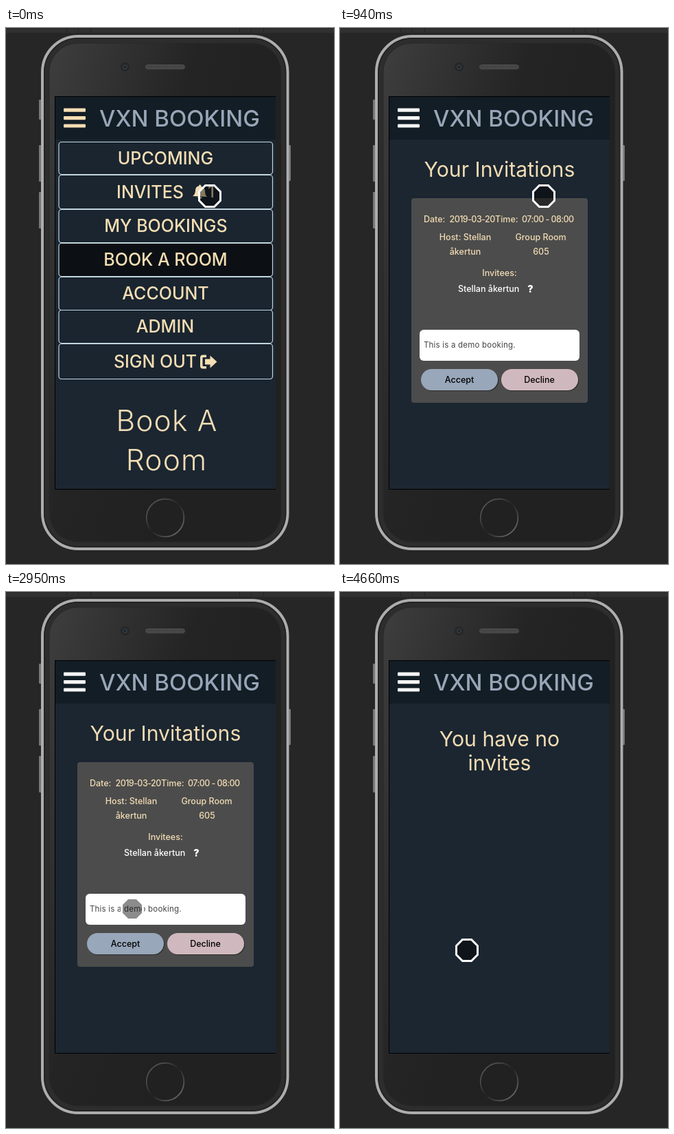
An HTML page that plays this animation: 478x778 px, repeating every 4.89 s.

```html
<!DOCTYPE html>
<html lang="en">
<head>
<meta charset="utf-8">
<title>Room booking demo</title>
<style>
  html, body { margin: 0; width: 100%; height: 100%; overflow: hidden; background: #262626; }
  svg { display: block; width: 478px; height: 778px; font-family: Inter, "Open Sans", sans-serif; }
  text { fill: #f2dcb3; white-space: pre; }
  .mid { text-anchor: middle; }
  .title { font-size: 33px; font-weight: 500; fill: #98a6b8; }
  .item text { font-size: 25px; font-weight: 500; fill: #f5deb3; }
  .heading { font-size: 30.2px; }
  .large { font-size: 42.5px; font-weight: 350; letter-spacing: 1.2px; }
  .card text { font-size: 12.5px; font-weight: 450; }
  .card .digits { letter-spacing: -.55px; }
  .card .white { fill: #fff; }
  .card .button { fill: #000; }
  .card .note { font-size: 11.5px; font-weight: 400; fill: #444; letter-spacing: .2px; }
</style>
</head>
<body>
<svg viewBox="0 0 478 778">
  <defs>
    <linearGradient id="gloss" x1="0" y1="0" x2=".75" y2=".5">
      <stop offset="0" stop-color="#3e3e3e"/>
      <stop offset=".3" stop-color="#313131"/>
      <stop offset=".6" stop-color="#242424"/>
      <stop offset="1" stop-color="#212121"/>
    </linearGradient>
    <linearGradient id="home" x1="0" y1="0" x2="1" y2="1">
      <stop offset="0" stop-color="#5c5c5c"/>
      <stop offset=".25" stop-color="#4a4a4a"/>
      <stop offset=".5" stop-color="#222"/>
      <stop offset=".8" stop-color="#5a5a5a"/>
      <stop offset="1" stop-color="#777"/>
    </linearGradient>
    <pattern id="mesh" width="3" height="3" patternUnits="userSpaceOnUse">
      <rect width="3" height="3" fill="#4a4a4a"/><circle cx="1.5" cy="1.5" r=".8" fill="#333"/>
    </pattern>
    <clipPath id="screenClip"><rect x="72" y="162" width="321" height="507"/></clipPath>
    <clipPath id="menuClip"><rect id="menuWindow" x="72" y="162" width="321" height="353"/></clipPath>
  </defs>

  <rect width="478" height="778" fill="#262626"/>
  <rect width="478" height="6" y="1" fill="#303030"/>
  <path d="M88.500 0V6M105.500 0V6M123.500 0V6M340.500 0V6M357.500 0V6M375.500 0V6" stroke="#222"/>

  <g fill="#777">
    <rect x="48" y="104" width="4" height="29" rx="1"/>
    <rect x="48" y="170" width="4" height="53" rx="1"/>
    <rect x="48" y="238" width="4" height="53" rx="1"/>
    <rect x="411" y="170" width="4" height="52" rx="1"/>
  </g>
  <rect x="53" y="12" width="357.500" height="744" rx="52" fill="#2d2d2d" stroke="#adadad" stroke-width="4"/>
  <rect x="56" y="15" width="351.500" height="738" rx="49" fill="none" stroke="#222" stroke-width="1.500"/>
  <rect x="63" y="22" width="338" height="724" rx="42" fill="url(#gloss)" stroke="#292929"/>
  <circle cx="173.500" cy="56.500" r="6" fill="#282828" stroke="#242424"/>
  <circle cx="173.500" cy="56.500" r="2.700" fill="#1b222c" stroke="#414a55"/>
  <rect x="203.500" y="53.500" width="57" height="6" rx="3" fill="url(#mesh)" stroke="#505050"/>
  <circle cx="232" cy="711" r="27.300" fill="none" stroke="url(#home)" stroke-width="1.800"/>

  <rect x="71" y="99" width="322" height="571" fill="#000"/>
  <rect x="72" y="100" width="321" height="569" fill="#1b2631"/>
  <rect x="72" y="100" width="321" height="62" fill="#131d25"/>
  <g id="burger">
    <rect x="84" y="116.600" width="32" height="5.140" rx="1.100"/>
    <rect x="84" y="128" width="32" height="5.140" rx="1.100"/>
    <rect x="84" y="139.400" width="32" height="5.140" rx="1.100"/>
  </g>
  <text class="title" x="136" y="143">VXN BOOKING</text>

  <g clip-path="url(#screenClip)">
    <g id="roomPage" class="large">
      <text class="mid" x="234.500" y="584.500">Book A</text>
      <text class="mid" x="234" y="642">Room</text>
    </g>
    <g id="page">
      <text class="heading mid" x="232.500" y="216">Your Invitations</text>
      <g id="card" class="card">
        <rect x="104" y="247" width="257" height="297" rx="4" fill="#4c4c4c"/>
        <text x="122" y="282">Date:</text>
        <text class="digits" x="159.500" y="282">2019-03-20</text>
        <text x="226" y="282">Time:</text>
        <text class="digits" x="265" y="282">07:00 - 08:00</text>
        <text class="mid" x="182.500" y="308">Host: Stellan</text>
        <text class="mid" x="182.500" y="329">åkertun</text>
        <text class="mid" x="292.500" y="308">Group Room</text>
        <text class="mid" x="293" y="329">605</text>
        <text class="mid" x="232.500" y="360">Invitees:</text>
        <text class="white" x="172" y="383">Stellan åkertun</text>
        <text class="white mid" x="277.500" y="383.500" style="font-size:14px;font-weight:900">?</text>
        <rect x="116" y="438" width="233" height="45" rx="6" fill="#fff"/>
        <text class="note" x="122" y="464">This is a demo booking.</text>
        <rect x="119" y="496" width="112" height="31" rx="15.500" fill="#2b2b2b"/>
        <rect x="118" y="495" width="112" height="31" rx="15.500" fill="#98a7b9"/>
        <rect x="236" y="496" width="112" height="31" rx="15.500" fill="#2b2b2b"/>
        <rect x="235" y="495" width="112" height="31" rx="15.500" fill="#d0b9be"/>
        <text class="button mid" x="174" y="515">Accept</text>
        <text class="button mid" x="290.500" y="515">Decline</text>
      </g>
    </g>
    <g id="emptyPage" class="heading">
      <text class="mid" x="232.500" y="224">You have no</text>
      <text class="mid" x="232.500" y="259">invites</text>
    </g>
    <g id="menu" clip-path="url(#menuClip)">
      <g id="items"></g>
      <g fill="#f5deb3">
        <path d="M272 244Q276 241 276 236Q276 230 281 229.500Q281 227 283 227.500Q285 228 284.500 230Q290 232 290 237Q290 242 293 245Z"/>
        <path d="M279 245.500H286Q285 248 282.500 248Q280 248 279 245.500Z"/>
        <text x="294" y="246" font-size="24" font-weight="500">1</text>
        <path d="M292 474.500V478H287.500Q286.500 478 286.500 479V490Q286.500 491 287.500 491H292V494.500H287Q283 494.500 283 490.500V478.500Q283 474.500 287 474.500Z"/>
        <path d="M297.500 475.500L307.500 484.500L297.500 493.500V488.500H290V480.500H297.500Z"/>
      </g>
    </g>
  </g>

  <path id="cursor" d="M-6.500 -15.500H6.500L15.500 -6.500V6.500L6.500 15.500H-6.500L-15.500 6.500V-6.500Z"
        fill="#000" fill-opacity=".45" stroke="#fff" stroke-width="3"/>
</svg>

<script>
const LOOP = 4890;
const MENU_TOP = 164, MENU_HEIGHT = 351;
const CLICK = 400, NAVIGATE = 480, CARD_IN = 780, MENU_GONE = 940, ACCEPTED = 4590, EMPTY = 4660;
const SLIDE = { start: 459, duration: 442 };
const FADE = 230;

// label, top, bottom, text centre
const menuItems = [
  ["UPCOMING", 165.5, 212.5, 232.5],
  ["INVITES", 213.5, 262.5, 210],
  ["MY BOOKINGS", 263.5, 311.5, 233],
  ["BOOK A ROOM", 312.5, 360.5, 232.5],
  ["ACCOUNT", 361.5, 409.5, 232.5],
  ["ADMIN", 409.5, 457.5, 232],
  ["SIGN OUT", 458.5, 509.5, 217.5]
];

// pointer strokes: start time, then one position per tick
const TICK = 76.7;
const strokes = [
  [0, [297, 244]],
  [250, [295, 242]],
  [400, [297, 244]],
  [1400, [293, 270], [281, 322], [262, 388], [242, 460], [226, 528], [219, 558]],
  [2410, [212, 536], [228, 506], [240, 476], [209, 461], [171, 460]],
  [2950, [184, 460], [206, 463], [229, 468], [242, 473]],
  [3410, [242, 489], [239, 520], [227, 545], [208, 553], [192, 545], [186, 530], [185, 521]],
  [3940, [185, 520]]
];

const $ = id => document.getElementById(id);
const show = (id, visible) => $(id).setAttribute("display", visible ? "inline" : "none");
const progress = (t, start, duration) => Math.min(1, Math.max(0, (t - start) / duration));

$("items").innerHTML = menuItems.map(([label, top, bottom, x]) => `
  <g class="item">
    <rect x="77" y="${top}" width="311.5" height="${bottom - top}" rx="4" stroke-width="1.2"/>
    <text class="mid" x="${x}" y="${(top + bottom) / 2 + 8.8}">${label}</text>
  </g>`).join("");
const boxes = [...document.querySelectorAll(".item rect")];

function paintBox(box, fill, stroke) {
  box.setAttribute("fill", fill);
  box.setAttribute("stroke", stroke);
}

function mix(from, to, p) {
  return `rgb(${from.map((v, i) => Math.round(v + (to[i] - v) * p))})`;
}

function pointerAt(t) {
  const [start, ...points] = strokes.findLast(s => s[0] <= t);
  const step = Math.floor((t - start + 5) / TICK);
  return points[Math.min(step, points.length - 1)];
}

function menuHeight(t) {
  const p = progress(t, SLIDE.start, SLIDE.duration);
  return MENU_HEIGHT * (1 + Math.cos(Math.PI * p)) / 2;
}

// the slide advances in visible ticks
function slideTime(t) {
  return t < CLICK ? t : CLICK + Math.floor((t - CLICK + 5) / TICK) * TICK;
}

function render(t) {
  const open = t < MENU_GONE;
  const navigated = t >= NAVIGATE;
  const time = slideTime(t);
  const height = open ? menuHeight(time) : 0;
  const fading = mix([12, 16, 20], [26, 37, 48], progress(time, NAVIGATE, FADE));

  $("burger").setAttribute("fill", navigated ? "#f4f4f4" : "#f5deb3");
  show("menu", open);
  $("menuWindow").setAttribute("height", MENU_TOP - 162 + height);
  boxes.forEach((box, i) => {
    const hovered = i === 1 && t >= CLICK;
    const fill = hovered ? "#3c3f54" : i === 3 ? fading : "#1a2530";
    paintBox(box, fill, hovered ? "#484d62" : "#c3d6de");
  });

  show("roomPage", !navigated);
  show("page", navigated && t < EMPTY);
  show("card", t >= CARD_IN && t < ACCEPTED);
  show("emptyPage", t >= EMPTY);
  $("page").setAttribute("transform", `translate(0 ${height})`);
  $("cursor").setAttribute("transform", `translate(${pointerAt(t)})`);
}

function frame() {
  render(performance.now() % LOOP);
  requestAnimationFrame(frame);
}
frame();
</script>
</body>
</html>
```
